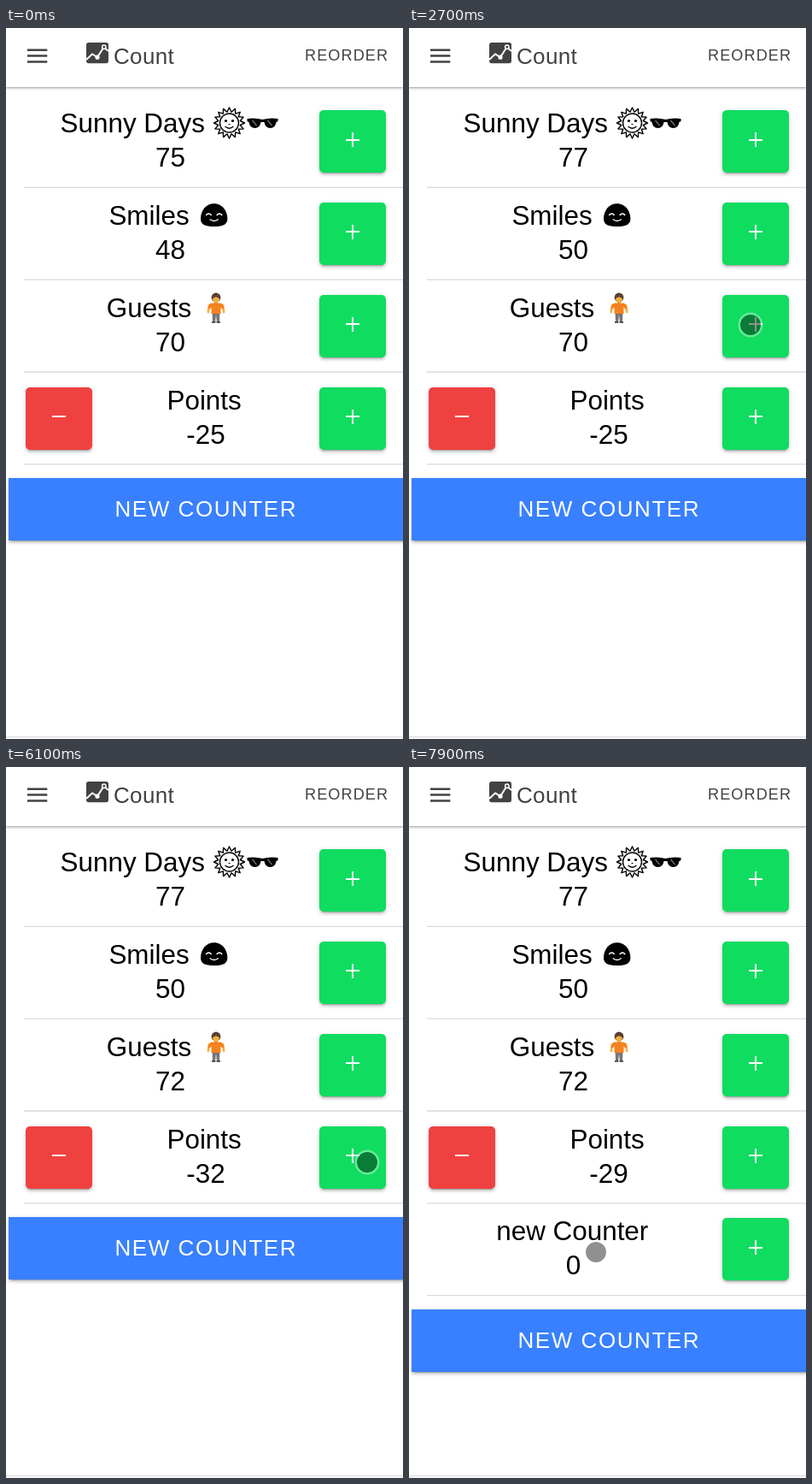
Recreate the animation shown at these times as an HTML page. Size 465 by 831 pixels, loop 8000 ms.

```html
<!DOCTYPE html>
<html lang="en">
<head>
<meta charset="utf-8">
<title>Count</title>
<style>
html, body { margin: 0; width: 100%; height: 100%; overflow: hidden; background: #fff; }
#stage { position: relative; width: 465px; height: 831px; overflow: hidden; background: #fff; }
header { position: absolute; left: 0; top: 0; width: 465px; height: 69px; background: #fff;
  box-shadow: 0 1px 2px rgba(0,0,0,.28), 0 2px 4px rgba(0,0,0,.14); }
footer { position: absolute; left: 0; top: 828px; width: 465px; height: 3px; background: #f8f8f8;
  border-top: 1px solid #dcdcdc; box-sizing: border-box; }
svg { position: absolute; left: 0; top: 0; font-family: "Liberation Sans", Arial, sans-serif; }
.btn { position: absolute; width: 78px; height: 73px; border-radius: 5px; overflow: hidden;
  box-shadow: 0 4px 1px -3px rgba(0,0,0,.2), 0 3px 3px rgba(0,0,0,.14), 0 1px 6px rgba(0,0,0,.12); }
.btn.active { box-shadow: 0 4px 5px -1px rgba(0,0,0,.2), 0 6px 9px -1px rgba(0,0,0,.16), 0 1px 6px rgba(0,0,0,.12); }
.plus { background: #10dc60; left: 367px; }
.minus { background: #f04141; left: 23px; }
.wide { background: #3880ff; left: 3px; width: 466px; border-radius: 0; }
.plus::before, .minus::before { content: ""; position: absolute; left: 31px; top: 33.5px; width: 16px; height: 2px; background: #fff; }
.plus::after { content: ""; position: absolute; left: 38px; top: 26px; width: 2px; height: 17px; background: #fff; }
.ripple { position: absolute; border-radius: 50%; background: #fff; }
.name, .num { font-size: 31.4px; }
.num { text-anchor: middle; }
</style>
</head>
<body>
<div id="stage">
  <header></header>
  <footer></footer>
  <svg width="465" height="831" viewBox="0 0 465 831">
    <path d="M25 25.8H48.3M25 32.6H48.3M25 39.4H48.3" stroke="#424242" stroke-width="2.5"/>
    <rect x="94" y="17" width="26" height="24.3" rx="2.8" fill="#424242"/>
    <g fill="none" stroke="#fff" stroke-width="2">
      <path d="M94 37L101 30.5L107 34.2L114.5 22.5L120 27"/>
      <circle cx="114.8" cy="22.3" r="2.2" fill="#424242" stroke-width="1.5"/>
      <circle cx="107" cy="34.2" r="2" fill="#fff" stroke-width="1.2"/>
    </g>
    <g fill="#424242">
      <text x="126" y="42" font-size="26" letter-spacing=".32">Count</text>
      <text x="350" y="38.2" font-size="18.1" letter-spacing="1.09">REORDER</text>
    </g>

    <g id="sun" transform="translate(261.5 111)" fill="none" stroke="#000" stroke-width="1.4" stroke-linejoin="round">
      <path id="rays"/>
      <circle r="11"/>
      <path d="M-5 4Q0 8.5 5 4M-1 1.5H1" stroke-width="1.2"/>
      <g fill="#000" stroke="none"><circle cx="-4" cy="-2.5" r="1.6"/><circle cx="4" cy="-2.5" r="1.6"/></g>
    </g>
    <g transform="translate(300.5 111)">
      <path d="M-18 -5Q-9 -6.5 0 -4Q9 -6.5 18 -5V-2L16 -1Q15 6 9 6Q3 6 2 -1H-2Q-3 6 -9 6Q-15 6 -16 -1L-18 -2Z"/>
      <path d="M-12 -3L-7 3M6 -3L11 3" stroke="#777" stroke-width="1.2"/>
    </g>
    <g transform="translate(243.7 219)">
      <path d="M0 -13.7C9 -13.7 15.7 -6 15.7 4C15.7 11 10 13 0 13S-15.7 11 -15.7 4C-15.7 -6 -9 -13.7 0 -13.7Z"/>
      <path d="M-9.5 0Q-6.3 -4 -3 0M3 0Q6.3 -4 9.5 0M-5 4.5Q0 8.5 5 4.5" fill="none" stroke="#fff" stroke-width="1.3"/>
    </g>
    <g transform="translate(246 327)">
      <path d="M-4.5 5H4.5L4 16H.8L0 8L-.8 16H-4Z" fill="#757575"/>
      <path d="M-5 17.8V16H-.6V17.8ZM.6 17.8V16H5V17.8Z" fill="#424242"/>
      <path d="M-9.2 5L-8 -3M9.2 5L8 -3" stroke="#f3b03c" stroke-width="2.6" stroke-linecap="round"/>
      <path d="M-2 -7H2V-3H-2Z" fill="#dd9a2e"/>
      <path d="M-5 -5.5H5Q8.5 -5.5 9.4 1L7 1.5L5.5 -1V7H-5.5V-1L-7 1.5L-9.4 1Q-8.5 -5.5 -5 -5.5Z" fill="#f5811f"/>
      <ellipse cy="-12" rx="5.4" ry="5.4" fill="#543930"/>
      <ellipse cy="-10.4" rx="3.9" ry="4.6" fill="#f3b03c"/>
      <path d="M-4.2 -11Q-3 -16 1 -14.8Q4 -14 4.2 -11Q1 -12 0 -13Q-2 -11.5 -4.2 -11Z" fill="#543930"/>
    </g>
    <g id="list"></g>
    <text id="label" x="234.3" y="571.3" font-size="26" letter-spacing="1.56" text-anchor="middle" fill="#fff">NEW COUNTER</text>
    <g id="cursor">
      <circle r="12" fill="#000" fill-opacity=".435"/>
      <circle r="13.2" fill="none" stroke="#fff" stroke-opacity=".36" stroke-width="2.5"/>
    </g>
  </svg>
</div>
<script>
const $ = id => document.getElementById(id);
const stage = $('stage'), svg = stage.querySelector('svg');
const LOOP = 8000, STEP = 100, PITCH = 107.85, ADDED = 7100;
const MINUS = 5, WIDE = 6;

// name, left edge, centre of the number, starting value
const rows = [
  ['Sunny Days', 63.6, 192.5, 75],
  ['Smiles', 120.4, 192.5, 48],
  ['Guests', 117.8, 192.5, 70],
  ['Points', 188.5, 234, -25],
  ['new Counter', 102.3, 192.5, 0]
];
// time, x, y
const path = [
  [500, 436, 125], [600, 426, 136], [1400, 426, 136], [1700, 404, 222], [1900, 403, 219],
  [2600, 403, 219], [2700, 400, 347], [3300, 400, 347], [3700, 52, 434], [5600, 52, 434],
  [6100, 423, 462], [6700, 423, 462], [7000, 310, 552], [7100, 312, 552], [7400, 312, 552],
  [7900, 219, 567], [8000, 219, 567]
];
// button, times of its taps
const taps = [
  [0, 800, 1200], [1, 1900, 2200], [2, 2900, 3200],
  [MINUS, 3900, 4200, 4400, 4700, 4900, 5200, 5400],
  [3, 6200, 6400, 6700], [WIDE, ADDED]
].flatMap(([button, ...times]) => times.map(time => ({ button, time })));

function addButton(kind, top) {
  const el = document.createElement('div');
  el.className = 'btn ' + kind;
  el.style.top = top + 'px';
  const ripple = document.createElement('div');
  ripple.className = 'ripple';
  el.append(ripple);
  stage.insertBefore(el, svg);
  return { el, ripple, top };
}

$('rays').setAttribute('d', 'M' + Array.from({ length: 32 }, (_, i) => {
  const a = i * Math.PI / 16, r = i % 2 ? 13 : 18;
  return (r * Math.sin(a)).toFixed(1) + ' ' + (-r * Math.cos(a)).toFixed(1);
}).join('L') + 'Z');

$('list').innerHTML = rows.map(([name, x, mid], i) => `<g transform="translate(0 ${i * PITCH})">
  <text class="name" x="${x}" y="122">${name}</text>
  <text class="num" x="${mid}" y="162"></text>
  <path d="M21 186.3H465" stroke="#dadada" stroke-width="1.3"/></g>`).join('');
const groups = [...$('list').children];
const nums = groups.map(g => g.querySelector('.num'));
const buttons = rows.map((_, i) => addButton('plus', 96 + i * PITCH));
buttons.push(addButton('minus', 96 + 3 * PITCH), addButton('wide', 526));

const mix = (a, b, k) => a + (b - a) * k;

function cursorAt(t) {
  const i = path.findIndex(p => p[0] > t);
  const [t0, x0, y0] = path[i - 1], [t1, x1, y1] = path[i];
  const u = (t - t0) / (t1 - t0), k = u * u * (3 - 2 * u);
  return [mix(x0, x1, k), mix(y0, y1, k)];
}

function drawButton(b, i, t) {
  const wide = i === WIDE;
  const tap = taps.filter(p => p.button === i && p.time <= t).pop();
  const age = tap ? t - tap.time - (wide ? 0 : 100) : -1;
  const life = wide ? 500 : 200;
  const on = age >= 0 && age < life;
  b.el.classList.toggle('active', on && age < 200 && !(wide && age === 0));
  b.ripple.style.display = on ? '' : 'none';
  if (!on) return;
  const k = Math.min(1, age / 225);
  const r = wide ? mix(124, 243, k) : mix(28, 60, k);
  const [x, y] = cursorAt(tap.time);
  const cx = wide ? mix(304.5, 231, k) : mix(x - b.el.offsetLeft, 39, k);
  const cy = wide ? mix(26, 36, k) : mix(y - b.top, 36, k);
  Object.assign(b.ripple.style, {
    left: cx - r + 'px', top: cy - r + 'px', width: 2 * r + 'px', height: 2 * r + 'px',
    opacity: .1 * Math.min(1, (life - age) / (life * .6))
  });
}

function draw(t) {
  const added = t >= ADDED, shift = added ? PITCH : 0;
  groups[4].style.display = buttons[4].el.style.display = added ? '' : 'none';
  buttons[WIDE].el.style.top = 526 + shift + 'px';
  $('label').setAttribute('y', 571.3 + shift);

  const count = i => taps.filter(p => p.button === i && p.time <= t).length;
  rows.forEach((row, i) => {
    nums[i].textContent = row[3] + count(i) - (i === 3 ? count(MINUS) : 0);
  });
  buttons.forEach((b, i) => drawButton(b, i, t));

  const seen = t >= path[0][0];
  $('cursor').style.display = seen ? '' : 'none';
  if (seen) $('cursor').setAttribute('transform', `translate(${cursorAt(t).join(' ')})`);
}

const start = performance.now();
function tick() {
  const t = (performance.now() - start) % LOOP;
  draw(Math.floor(t / STEP) * STEP);
  requestAnimationFrame(tick);
}
tick();
</script>
</body>
</html>
```
